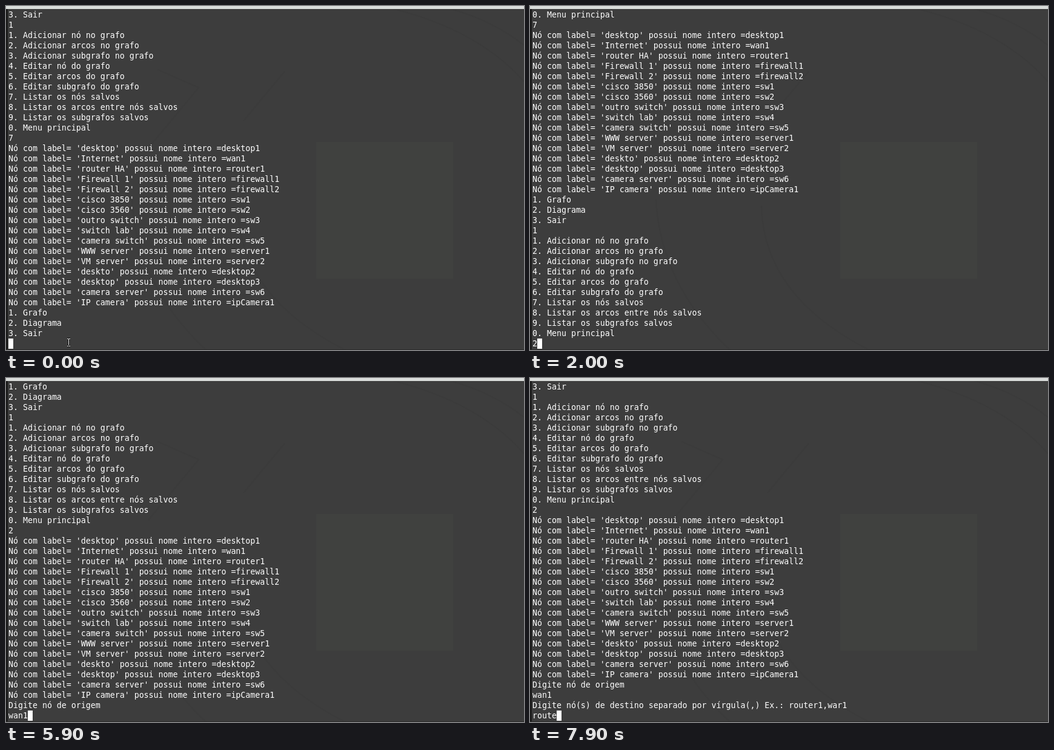
Write an HTML page with a canvas that moves like this. It is 855 px wide and 569 px high and loops after 8 s.

```html
<!DOCTYPE html>
<html lang="pt">
<head>
<meta charset="utf-8">
<title>Terminal</title>
<style>
  html, body { margin: 0; width: 100%; height: 100%; overflow: hidden; background: #3d3d3d; }
  canvas { display: block; }
</style>
</head>
<body>
<canvas id="stage" width="855" height="569"></canvas>
<script>
const canvas = document.getElementById('stage');
const ctx = canvas.getContext('2d');
const W = 855, H = 569, LOOP = 8000;
const CELL = 8, ROW = 17, LEFT = 4, TOP = 6, LAST_ROW = 32;

const mainMenu = ['1. Grafo', '2. Diagrama', '3. Sair'];
const graphMenu = [
  '1. Adicionar nó no grafo',
  '2. Adicionar arcos no grafo',
  '3. Adicionar subgrafo no grafo',
  '4. Editar nó do grafo',
  '5. Editar arcos do grafo',
  '6. Editar subgrafo do grafo',
  '7. Listar os nós salvos',
  '8. Listar os arcos entre nós salvos',
  '9. Listar os subgrafos salvos',
  '0. Menu principal'
];
const nodes = [
  ['desktop', 'desktop1'], ['Internet', 'wan1'], ['router HA', 'router1'],
  ['Firewall 1', 'firewall1'], ['Firewall 2', 'firewall2'],
  ['cisco 3850', 'sw1'], ['cisco 3560', 'sw2'], ['outro switch', 'sw3'],
  ['switch lab', 'sw4'], ['camera switch', 'sw5'], ['WWW server', 'server1'],
  ['VM server', 'server2'], ['deskto', 'desktop2'], ['desktop', 'desktop3'],
  ['camera server', 'sw6'], ['IP camera', 'ipCamera1']
].map(([label, name]) => `Nó com label= '${label}' possui nome intero =${name}`);

const log = [
  '3. Sair', '1', ...graphMenu, '7', ...nodes, ...mainMenu,
  '1', ...graphMenu,
  '2', ...nodes, 'Digite nó de origem',
  'wan1', 'Digite nó(s) de destino separado por vírgula(,) Ex.: router1,war1'
];

// [start ms, finished log lines, typed text, cursor shown]
const steps = [
  [0, 32, '', true],
  [300, 32, '', false],
  [400, 32, '', true],
  [500, 32, '1', true],
  [1000, 32, '1', false],
  [1100, 43, '', true],
  [1700, 43, '', false],
  [2000, 43, '2', true],
  [2400, 61, '', true],
  [4400, 61, '', false],
  [4900, 61, '', true],
  [5000, 61, 'w', true],
  [5100, 61, 'wa', true],
  [5300, 61, 'wan', true],
  [5900, 61, 'wan1', true],
  [6000, 63, '', true],
  [6700, 63, '', false],
  [7400, 63, 'ro', true],
  [7600, 63, 'rou', true],
  [7800, 63, 'rout', true],
  [7900, 63, 'route', true]
];
const POINTER_HIDES = 400;

function rect(color, x, y, w, h) {
  ctx.fillStyle = color;
  ctx.fillRect(x, y, w, h);
}

function stroke(color, width, path) {
  ctx.strokeStyle = color;
  ctx.lineWidth = width;
  ctx.stroke(new Path2D(path));
}

function drawBackdrop() {
  rect('#3d3d3d', 0, 0, W, H);
  // faint wallpaper showing through the window
  stroke('#3b3b3b', 2, 'M208 320 Q215 460 330 569 M382 330 Q385 480 560 569');
  stroke('#3b3b3b', 2, 'M235 235 L318 135 L250 105 M392 190 L460 108');
  stroke('#3b3b3b', 2, 'M640 5 Q780 40 855 125 M735 5 Q805 25 855 65');
  rect('#40413f', 512, 225, 226, 226);
  rect('#1c1c1c', 0, 5, 3, H - 5);
  rect('#2a2a2a', 0, H - 1, W, 1);
  rect('#d9dcda', 0, 0, W, 5);
}

function drawLine(text, row) {
  ctx.fillText(text, LEFT, TOP + row * ROW + 13);
}

function drawPointer() {
  const beam = 'M101 550.5 H103 L103.5 551 L104 550.5 H106 M103.5 551 V561 M101 562.5 H103 L103.5 562 L104 562.5 H106';
  stroke('#111', 3, beam);
  stroke('#fff', 1, beam);
}

function draw(t) {
  const [, count, typed, cursor] = steps.findLast(step => step[0] <= t);
  drawBackdrop();
  // 13.289px gives an 8px advance
  ctx.font = '13.289px "DejaVu Sans Mono", monospace';
  ctx.fillStyle = '#fff';
  log.slice(count - LAST_ROW, count).forEach(drawLine);
  drawLine(typed, LAST_ROW);
  if (cursor) rect('#fff', LEFT + typed.length * CELL, TOP + LAST_ROW * ROW, CELL, ROW);
  if (t < POINTER_HIDES) drawPointer();
}

const start = performance.now();
function tick() {
  draw((performance.now() - start) % LOOP);
  requestAnimationFrame(tick);
}
tick();
</script>
</body>
</html>
```
